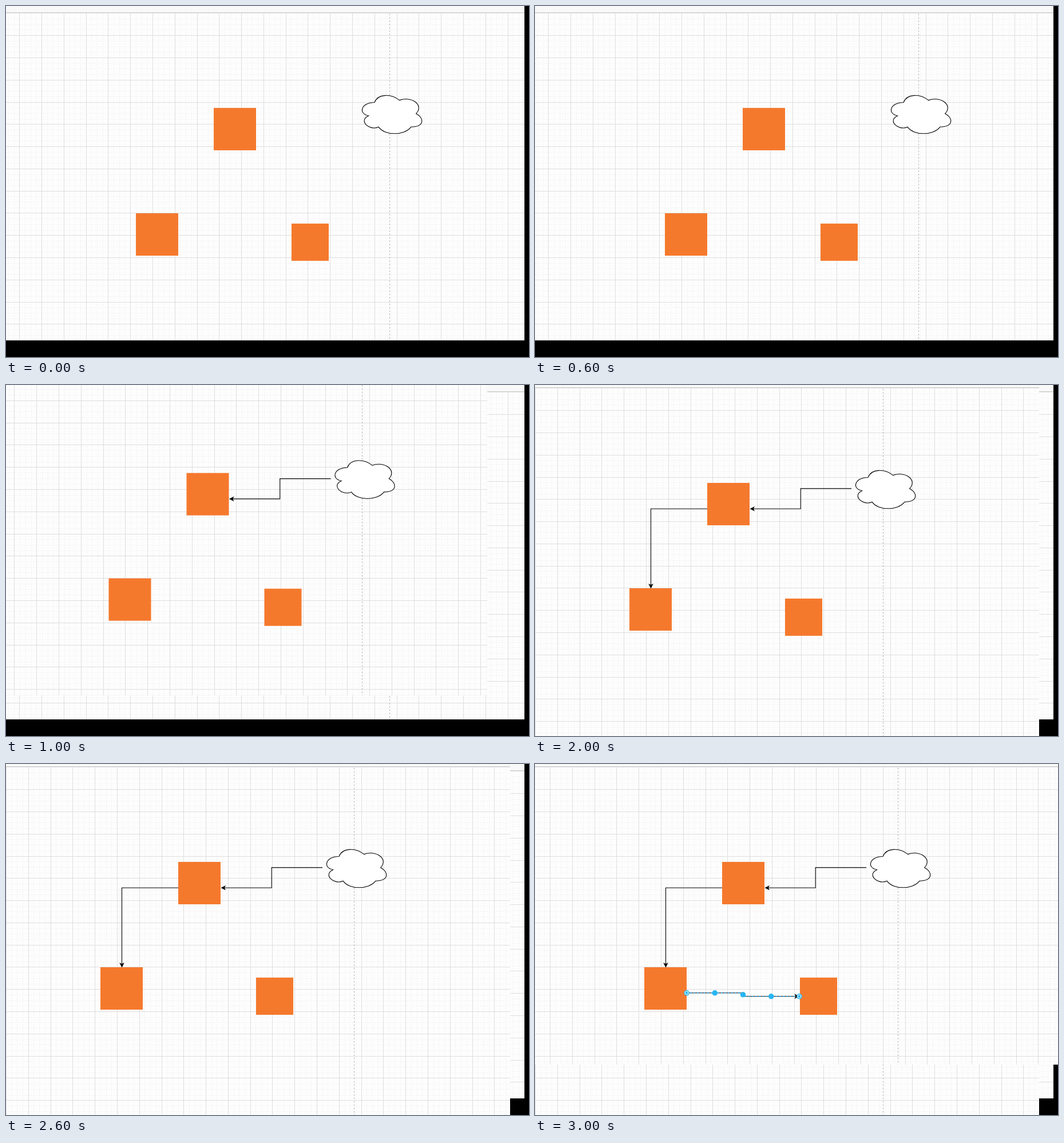
Write an HTML page with a canvas that moves like this. It is 914 px wide and 613 px high and loops after 4 s.

```html
<!DOCTYPE html>
<html lang="en">
<head>
<meta charset="utf-8">
<title>Diagram</title>
<style>
  html, body { margin: 0; width: 100%; height: 100%; overflow: hidden; background: #000; }
  canvas { display: block; }
</style>
</head>
<body>
<canvas id="stage" width="914" height="613"></canvas>
<script>
const ctx = document.getElementById('stage').getContext('2d');
const STEP = 1000;
const MAJOR = 38.79, MINOR = MAJOR / 4;
const ORANGE = '#f5792d', BLUE = '#29b6f2';

// Each view covers only its own w x h; older views stay visible beyond it.
const views = [
  { w: 906, h: 584, dx: 0,     dy: 0,     links: 0 },
  { w: 841, h: 542, dx: -47.5, dy: -24.3, links: 1 },
  { w: 881, h: 613, dx: -62,   dy: -7,    links: 2 },
  { w: 914, h: 525, dx: -36,   dy: -7,    links: 3 }
];

const squares = [[363, 178, 74], [227, 362, 74], [499, 380, 65]];

const links = [
  [[615, 187.9], [526.2, 187.9], [526.2, 223.2], [437.5, 223.2]],
  [[363, 223.2], [264.5, 223.2], [264.5, 362.5]],
  [[301, 406.8], [399.5, 406.8], [399.5, 412.8], [498, 412.8]]
];

const snap = v => Math.floor(v) + 0.5;

function gridLines(gap, color, dash, v) {
  const top = Math.max(0, 13 + v.dy);
  ctx.beginPath();
  ctx.strokeStyle = color;
  ctx.lineWidth = 1;
  ctx.setLineDash(dash);
  const x0 = (23.7 + v.dx + MAJOR * 4) % gap;
  const y0 = (51.65 + v.dy + MAJOR) % gap;
  for (let x = x0; x < v.w; x += gap) {
    ctx.moveTo(snap(x), top);
    ctx.lineTo(snap(x), v.h);
  }
  for (let y = y0; y < v.h; y += gap) {
    if (y < top) continue;
    ctx.moveTo(0, snap(y));
    ctx.lineTo(v.w, snap(y));
  }
  ctx.stroke();
  ctx.setLineDash([]);
}

function paper(v) {
  ctx.fillStyle = '#fdfdfd';
  ctx.fillRect(0, 0, v.w, v.h);
  gridLines(MINOR, '#f1f1f1', [2, 2], v);
  gridLines(MAJOR, '#dedede', [], v);

  const edge = 11.5 + v.dy;
  if (edge > 0) {
    ctx.fillStyle = '#f9f9f9';
    ctx.fillRect(0, 0, v.w, edge);
    ctx.fillStyle = '#cbcbcb';
    ctx.fillRect(0, Math.floor(edge), v.w, 1.5);
  }

  const x = snap(670.3 + v.dx);
  ctx.beginPath();
  ctx.strokeStyle = '#b5b5b5';
  ctx.setLineDash([2.91, 2.91]);
  ctx.moveTo(x, Math.max(0, edge + 2));
  ctx.lineTo(x, v.h);
  ctx.stroke();
  ctx.setLineDash([]);
}

function cloud(x, y, w, h) {
  const curve = (a, b, c, d, e, f) =>
    ctx.bezierCurveTo(x + a * w, y + b * h, x + c * w, y + d * h, x + e * w, y + f * h);
  ctx.beginPath();
  ctx.moveTo(x + 0.25 * w, y + 0.25 * h);
  curve(0.05, 0.25, 0, 0.5, 0.16, 0.55);
  curve(0, 0.66, 0.18, 0.9, 0.31, 0.8);
  curve(0.4, 1, 0.7, 1, 0.8, 0.8);
  curve(1, 0.8, 1, 0.6, 0.875, 0.5);
  curve(1, 0.3, 0.8, 0.1, 0.625, 0.2);
  curve(0.5, 0.05, 0.3, 0.05, 0.25, 0.25);
  ctx.closePath();
  ctx.fillStyle = '#fff';
  ctx.strokeStyle = '#000';
  ctx.fill();
  ctx.stroke();
}

function trace(pts) {
  ctx.beginPath();
  pts.forEach(([x, y]) => ctx.lineTo(x, y));
}

function arrow(pts) {
  const [x, y] = pts[pts.length - 1];
  const [px, py] = pts[pts.length - 2];
  const angle = Math.atan2(y - py, x - px);
  const shaft = pts.slice(0, -1);
  shaft.push([x - 6 * Math.cos(angle), y - 6 * Math.sin(angle)]);
  trace(shaft);
  ctx.strokeStyle = '#000';
  ctx.stroke();

  ctx.save();
  ctx.translate(x, y);
  ctx.rotate(angle);
  trace([[0, 0], [-8.5, 4.3], [-6.4, 0], [-8.5, -4.3]]);
  ctx.closePath();
  ctx.fillStyle = '#000';
  ctx.fill();
  ctx.restore();
}

function dot(x, y, r, fill) {
  ctx.beginPath();
  ctx.arc(x, y, r, 0, Math.PI * 2);
  ctx.fillStyle = fill;
  ctx.fill();
}

// Dashed highlight with round grips along a selected link.
function selection(pts) {
  const [a, b, c, d] = pts;
  const mid = (p, q) => [(p[0] + q[0]) / 2, (p[1] + q[1]) / 2];
  trace(pts);
  ctx.strokeStyle = '#00a8ff';
  ctx.setLineDash([3, 3]);
  ctx.stroke();
  ctx.setLineDash([]);
  [mid(a, b), mid(b, c), mid(c, d)].forEach(([x, y]) => dot(x, y, 4.8, BLUE));
  [a, d].forEach(([x, y]) => {
    dot(x, y, 4.8, BLUE);
    dot(x, y, 3.3, '#e4f5fd');
    dot(x, y, 2.2, BLUE);
  });
}

function drawView(v) {
  ctx.save();
  ctx.beginPath();
  ctx.rect(0, 0, v.w, v.h);
  ctx.clip();
  paper(v);
  ctx.translate(v.dx, v.dy);
  ctx.lineWidth = 1.1;
  ctx.fillStyle = ORANGE;
  squares.forEach(([x, y, s]) => ctx.fillRect(x, y, s, s));
  cloud(614.9, 149.1, 116.4, 77.6);
  links.slice(0, v.links).forEach(arrow);
  if (v.links === links.length) selection(links[links.length - 1]);
  ctx.restore();
}

let shown = -1;
function show(step) {
  if (step === shown) return;
  shown = step;
  ctx.fillStyle = '#000';
  ctx.fillRect(0, 0, 914, 613);
  views.slice(0, step + 1).forEach(drawView);
}

const start = performance.now();
function tick() {
  show(Math.floor((performance.now() - start) / STEP) % views.length);
  requestAnimationFrame(tick);
}
tick();
</script>
</body>
</html>
```
